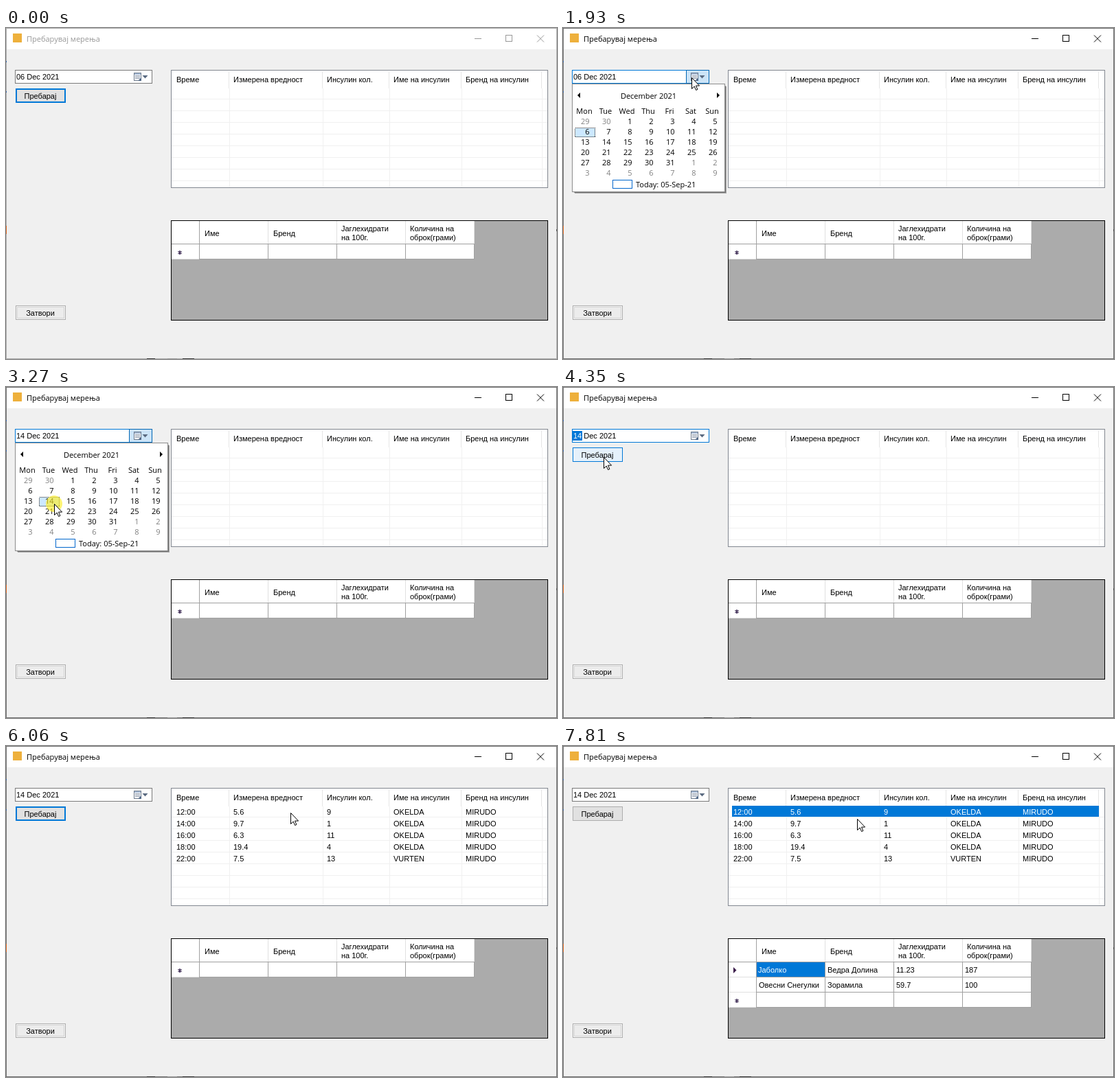
An HTML page that plays this animation: 802x482 px, repeating every 8 s.

```html
<!DOCTYPE html>
<html lang="mk">
<head>
<meta charset="utf-8">
<title>Пребарувај мерења</title>
<style>
  html, body { margin: 0; width: 100%; height: 100%; overflow: hidden; background: #f0f0f0; }
  svg { display: block; width: 802px; height: 482px; }
  rect, .crisp { shape-rendering: crispEdges; }
  text { font: 11px "Liberation Sans", Arial, sans-serif; white-space: pre; }
  .ui { font: 11px "Open Sans", "Noto Sans", sans-serif; }
  .mid { text-anchor: middle; }
  .end { text-anchor: end; }
</style>
</head>
<body>
<svg id="stage" viewBox="0 0 802 482" xmlns="http://www.w3.org/2000/svg"></svg>
<script>
const LOOP = 8000;
const BLUE = '#0078d7';
const $ = id => document.getElementById(id);

// --- drawing helpers ---
const fillBox = (x, y, w, h, fill, more = '') =>
  `<rect x="${x}" y="${y}" width="${w}" height="${h}" fill="${fill}" ${more}/>`;
const lineBox = (x, y, w, h, fill, line, more = '') =>
  `<rect x="${x + .5}" y="${y + .5}" width="${w - 1}" height="${h - 1}" fill="${fill}" stroke="${line}" ${more}/>`;
const label = (s, x, y, cls = '', more = '') =>
  `<text x="${x}" y="${y}" class="${cls}" ${more}>${s}</text>`;
const group = (id, body) => `<g id="${id}">${body}</g>`;
const path = (d, more) => `<path d="${d}" ${more}/>`;

// --- window frame ---
function frame() {
  return fillBox(0, 0, 802, 482, '#f0f0f0') + fillBox(1, 1, 800, 30, '#fff') +
    fillBox(10, 8, 13, 13, '#eeb03c') +
    label('Пребарувај мерења', 30, 20, 'ui', 'id="title"') +
    `<g id="caption" fill="none" stroke="#000">` +
    path('M682 15.5H692M727.5 10.5H736.5V19.5H727.5Z', 'class="crisp"') +
    path('M773 10.5L783 20.5M783 10.5L773 20.5', '') + '</g>' +
    lineBox(0, 0, 802, 482, 'none', '#707070', 'id="edge"') +
    fillBox(0, 48, 1, 2, '#2d5fa8') + fillBox(0, 92, 1, 2, '#2d5fa8') +
    fillBox(0, 288, 1, 12, '#d8641e') + fillBox(801, 293, 1, 3, '#444') +
    fillBox(205, 481, 12, 1, '#333') + fillBox(235, 481, 14, 1, '#999') + fillBox(257, 481, 17, 1, '#333');
}

// --- left side controls ---
function controls() {
  return lineBox(13, 61, 200, 20, '#fff', '#7a7a7a', 'id="dateBox"') +
    lineBox(179, 61, 34, 20, '#cce4f7', '#0067b5', 'id="drop"') +
    fillBox(14, 64, 14, 14, BLUE, 'id="dayMark"') +
    label('<tspan id="day">06</tspan> Dec 2021', 15, 75) +
    lineBox(186, 65, 11, 12, '#fff', '#6d7a8c') + fillBox(187, 66, 9, 2, '#a9bdd8') +
    [0, 1, 2].map(i => fillBox(188, 69 + 2 * i, 7, 1, '#8d99ab')).join('') +
    path('M192 77L197 72V77Z', 'fill="#4f6685"') +
    path('M198.5 69H206.5L202.5 73.5Z', 'fill="#5a6a80"') +
    lineBox(14, 88, 73, 21, '#e1e1e1', '#adadad', 'id="btn"') +
    lineBox(15, 89, 71, 19, 'none', BLUE, 'id="btnFocus"') +
    label('Пребарај', 50, 103, 'mid') +
    lineBox(14, 404, 73, 21, '#e1e1e1', '#adadad') +
    lineBox(15, 405, 71, 19, '#ececec', '#f6f6f6') + lineBox(16, 406, 69, 17, '#ececec', '#d4d4d4') +
    label('Затвори', 50, 419, 'mid');
}

// --- measurements list ---
const listX = [248, 331, 467, 564, 669];
const rows = [
  ['12:00', '5.6', '9', 'OKELDA', 'MIRUDO'],
  ['14:00', '9.7', '1', 'OKELDA', 'MIRUDO'],
  ['16:00', '6.3', '11', 'OKELDA', 'MIRUDO'],
  ['18:00', '19.4', '4', 'OKELDA', 'MIRUDO'],
  ['22:00', '7.5', '13', 'VURTEN', 'MIRUDO']
];
const cells = (list, xs, y) => list.map((s, i) => label(s, xs[i], y)).join('');

function measures() {
  let out = lineBox(240, 61, 549, 172, '#fff', '#828790');
  for (const x of [324, 460, 557, 662, 779])
    out += fillBox(x, 63, 1, 25, '#e5e5e5') + fillBox(x + 1, 88, 1, 144, '#f0f0f0');
  for (let y = 103; y < 230; y += 17) out += fillBox(241, y, 547, 1, '#f0f0f0');
  out += cells(['Време', 'Измерена вредност', 'Инсулин кол.', 'Име на инсулин', 'Бренд на инсулин'], listX, 79);
  out += fillBox(246, 87, 534, 16, BLUE, 'id="rowMark"');
  return out + group('data', rows.map((r, i) => group('row' + i, cells(r, listX, 100 + 17 * i))).join(''));
}

// --- meals grid ---
const gridX = [285, 385, 485, 585];
function gridRow(y) {
  return fillBox(241, y, 441, 22, '#fff') + fillBox(241, y + 21, 40, 1, '#e0e0e0') +
    fillBox(281, y + 21, 401, 1, '#a0a0a0') +
    [281, 381, 481, 581, 681].map(x => fillBox(x, y, 1, 22, '#a0a0a0')).join('');
}
function star(y) {
  return path(`M253 ${y - 3}V${y + 3}M250.4 ${y - 1.5}L255.6 ${y + 1.5}M255.6 ${y - 1.5}L250.4 ${y + 1.5}`,
    'stroke="#2e1a47" stroke-width="1.3"');
}
function meals() {
  const head = fillBox(241, 281, 441, 33, '#fff') + fillBox(241, 314, 441, 1, '#a0a0a0') +
    fillBox(281, 281, 1, 33, '#a0a0a0') +
    [381, 481, 581, 681].map(x => fillBox(x, 281, 1, 33, '#e0e0e0')).join('') +
    label('Име', 289, 303) + label('Бренд', 389, 303) +
    label('Јаглехидрати', 488, 296) + label('на 100г.', 488, 309) +
    label('Количина на', 588, 296) + label('оброк(грами)', 588, 309);
  const full = [315, 337, 359].map(gridRow).join('') +
    fillBox(282, 315, 99, 21, BLUE) + path('M248 322V331L252.5 326.5Z', 'fill="#3b1d4a"') +
    label('Јаболко', 284, 330, '', 'fill="#fff"') +
    cells(['', 'Ведра Долина', '11.23', '187'], gridX, 330) +
    cells(['Овесни Снегулки', 'Зорамила', '59.7', '100'], gridX, 352) + star(371);
  return lineBox(240, 280, 549, 146, '#ababab', '#000') + head +
    group('empty', gridRow(315) + star(327)) + group('full', full);
}

// --- month popup ---
const cellX = c => 17 + 31 * c;
const cellY = r => 130 + 15 * r;
function popup() {
  let out = fillBox(17, 85, 221, 156, '#000', 'opacity=".3"') + fillBox(16, 84, 221, 156, '#000', 'opacity=".3"') +
    lineBox(13, 81, 223, 158, '#fff', '#8c8c8c') + fillBox(13, 80, 167, 1, BLUE) +
    path('M25 94V102L21 98Z', '') + path('M224 94V102L228 98Z', '') +
    label('December 2021', 124.5, 103, 'ui mid');
  out += fillBox(0, 0, 30, 14, '#e5f3ff', 'id="hover"') +
    lineBox(0, 0, 30, 14, '#cce8ff', '#222', 'id="picked" stroke-dasharray="1 1"');
  ['Mon', 'Tue', 'Wed', 'Thu', 'Fri', 'Sat', 'Sun'].forEach((d, c) => {
    out += label(d, 31 + 31 * c, 125, 'ui mid');
  });
  for (let i = 0; i < 42; i++) {
    const n = i < 2 ? 29 + i : (i - 2) % 31 + 1;
    const inMonth = i > 1 && i < 33;
    out += label(n, 38.5 + 31 * (i % 7), 140 + 15 * Math.floor(i / 7), 'ui end', `fill="${inMonth ? '#000' : '#808080'}"`);
  }
  return out + lineBox(72, 221, 29, 13, '#fff', '#0066cc', 'rx="1"') + label('Today: 05-Sep-21', 106, 232, 'ui');
}

$('stage').innerHTML = frame() + controls() + measures() + meals() + group('popup', popup()) +
  group('pointer', '<circle id="click" r="12" fill="#ffee28" opacity=".65"/>' +
    path('M.5 .5V16.5L4.2 13L6.6 18.5L8.9 17.5L6.5 12.1H11.6Z', 'fill="#fff" stroke="#000" stroke-linejoin="round"'));

// --- pointer path: first step, last step, step count, end point, softness ---
const moves = [
  [60, 60, 1, 683, 464, 0],
  [510, 1290, 14, 235, 150, .5],
  [1350, 1640, 6, 187, 72, 0],
  [2320, 3100, 14, 70, 170, .8],
  [3550, 4350, 14, 59, 102, .8],
  [5180, 5290, 3, 129, 100, 0],
  [5350, 5940, 10, 399, 98, 0],
  [6000, 6180, 4, 429, 95, 0],
  [7350, 7350, 1, 431, 95, 0],
  [7520, 7810, 5, 428, 106, 0]
];
function pointerAt(t) {
  let x = 683, y = 464;
  for (const [from, to, n, ex, ey, soft] of moves) {
    if (t < from) break;
    const step = t >= to ? n : 1 + Math.floor((t - from) / (to - from) * (n - 1) + 1e-6);
    const u = step / n;
    const p = u * (1 - soft) + u * u * (3 - 2 * u) * soft;
    x += (ex - x) * p;
    y += (ey - y) * p;
  }
  return [Math.round(x), Math.round(y)];
}

// --- state at a moment ---
const show = (id, on) => { $(id).style.display = on ? '' : 'none'; };
const set = (id, attrs) => { for (const k in attrs) $(id).setAttribute(k, attrs[k]); };
const clicks = [[1700, 1930], [3270, 3380], [4410, 4680], [6680, 6790]];

function draw(t) {
  const [x, y] = pointerAt(t);
  const within = (a, b) => t >= a && t < b;
  const over = (l, top, r, b) => t >= 60 && x >= l && x < r && y >= top && y < b;

  const active = t >= 1700;
  set('title', { fill: active ? '#000' : '#999' });
  set('caption', { stroke: active ? '#000' : '#999' });
  set('edge', { stroke: active ? '#707070' : '#aaa' });

  const open = within(1760, 3380);
  const overDrop = over(179, 61, 213, 81);
  const dateFocus = within(1700, 4410);
  const picked = t >= 3270;
  set('dateBox', { stroke: dateFocus || over(13, 61, 213, 81) ? BLUE : '#7a7a7a' });
  set('drop', { fill: open ? '#cce4f7' : '#e5f1fb' });
  show('drop', open || overDrop);
  const marked = within(3380, 4410);
  show('dayMark', marked);
  $('day').textContent = picked ? '14' : '06';
  set('day', { fill: marked ? '#fff' : '#000' });

  show('popup', open);
  const col = Math.floor((x - 17) / 31), line = Math.floor((y - 130) / 15);
  const inDays = open && col >= 0 && col < 7 && line >= 0 && line < 6;
  show('hover', inDays);
  if (inDays) set('hover', { x: cellX(col), y: cellY(line) });
  set('picked', { x: cellX(picked ? 1 : 0) + .5, y: cellY(picked ? 2 : 1) + .5 });

  const hot = !open && over(14, 88, 87, 109);
  const pressed = within(4410, 4630);
  const btnFocus = t < 1700 || within(4410, 6790);
  set('btn', {
    fill: pressed ? '#cce4f7' : hot ? '#e5f1fb' : '#e1e1e1',
    stroke: pressed ? '#005499' : hot || btnFocus ? BLUE : '#adadad'
  });
  show('btnFocus', btnFocus && !hot);

  show('data', t >= 4630);
  const chosen = t >= 6790;
  show('rowMark', chosen);
  set('row0', { fill: chosen ? '#fff' : '#000' });
  show('empty', t < 6680);
  show('full', t >= 6680);

  show('pointer', t >= 60);
  set('pointer', { transform: `translate(${x} ${y})` });
  show('click', clicks.some(([a, b]) => within(a, b)));
}

function tick() {
  draw(performance.now() % LOOP);
  requestAnimationFrame(tick);
}
tick();
</script>
</body>
</html>
```
